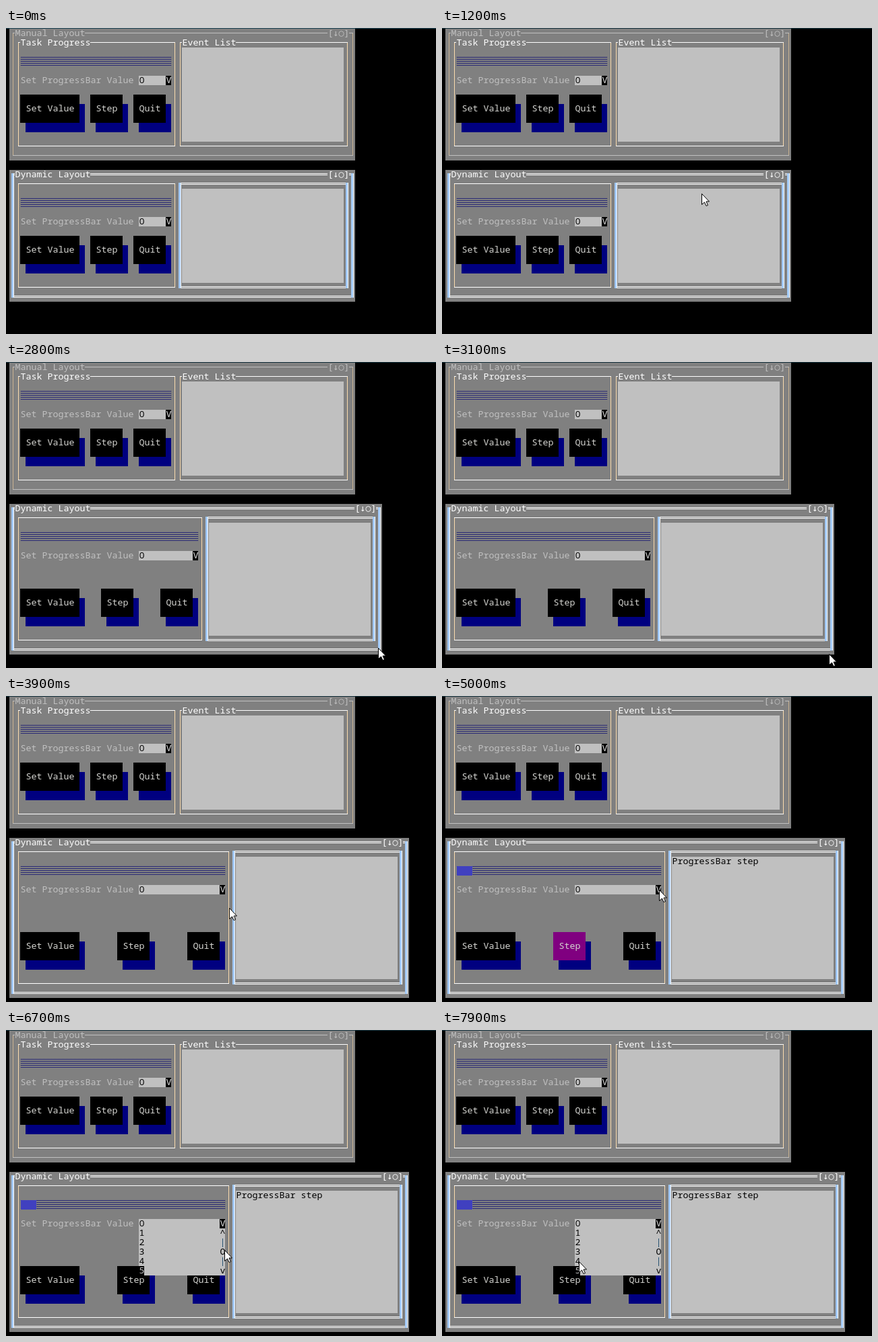
Recreate the animation shown at these times as an HTML page with a canvas. Size 638 by 455 pixels, loop 8000 ms.

```html
<!DOCTYPE html>
<html lang="en">
<head>
<meta charset="utf-8">
<title>Console layout</title>
<style>
html, body { margin: 0; width: 100%; height: 100%; overflow: hidden; background: #000; }
canvas { display: block; }
</style>
</head>
<body>
<canvas id="stage" width="638" height="455"></canvas>
<script>
const ctx = document.getElementById('stage').getContext('2d', { alpha: false });
const LOOP = 8000, STEP = 100;
const CW = 8, CH = 14;
const GRAY = '#808080', SILVER = '#c0c0c0', NAVY = '#000080', PURPLE = '#800080';
const FONT = '13.333px "Noto Sans Mono", "DejaVu Sans Mono", monospace';
const ZERO_FONT = '13.5px "Open Sans", sans-serif';
const SYMBOL_FONT = '13.3px "DejaVu Sans Mono", monospace';

// Pointer path: time, x, y
const PATH = [
  [100, 440, 2], [700, 362, 219], [1100, 362, 219], [1800, 524, 405],
  [2000, 512, 403], [2400, 512, 399], [2500, 512, 399], [2800, 552, 425],
  [3300, 589, 440], [3500, 589, 440], [3900, 331, 315], [4200, 204, 365],
  [4500, 204, 365], [5000, 322, 288], [5100, 322, 288], [5200, 321, 331],
  [5400, 321, 358], [5800, 321, 358], [6300, 324, 316], [6500, 324, 316],
  [6700, 324, 327], [6900, 324, 332], [7000, 324, 332], [7600, 216, 356],
  [7900, 203, 344]
];

const colX = c => 5 + c * CW;
const rowY = r => 1 + r * CH;

function rect(x, y, w, h, color) {
  ctx.fillStyle = color;
  ctx.fillRect(x, y, w, h);
}

function cells(c, r, w, h, color) {
  rect(colX(c), rowY(r), w * CW, h * CH, color);
}

function text(c, r, str, color, back) {
  if (back) cells(c, r, str.length, 1, back);
  ctx.fillStyle = color;
  [...str].forEach((ch, i) => {
    ctx.font = ch === '0' ? ZERO_FONT : '↓○'.includes(ch) ? SYMBOL_FONT : FONT;
    ctx.fillText(ch, colX(c + i) + 4.5, rowY(r) + 11);
  });
}

function singleFrame(c, r, w, h, color, side) {
  const x = colX(c) + 5, y = rowY(r) + 6;
  const wide = (w - 1) * CW, tall = (h - 1) * CH;
  for (const dx of [0, wide]) rect(x + dx, y, 1, tall + 1, side);
  for (const dy of [0, tall]) rect(x, y + dy, wide + 1, 1, color);
}

function doubleFrame(c, r, w, h) {
  const x = colX(c) + 3, y = rowY(r) + 5;
  const wide = (w - 1) * CW, tall = (h - 1) * CH;
  for (const dy of [0, 2, tall, tall + 2]) rect(x, y + dy, wide + 4, 1, '#fff');
  for (const dx of [0, wide]) {
    rect(x + dx, y, 3, tall + 3, '#a3caf8');
    rect(x + dx + 3, y, 1, tall + 3, '#fff');
  }
}

function paneFrame(c, r, w, h) {
  singleFrame(c, r, w, h, '#fff', '#fbdcae');
}

function hatch(color, gapX, gapY, shift) {
  const tile = document.createElement('canvas');
  tile.width = gapX;
  tile.height = gapY;
  const g = tile.getContext('2d');
  g.fillStyle = color;
  g.fillRect(0, 0, 1, 1);
  if (shift) g.fillRect(gapX / 2, gapY / 2, 1, 1);
  return ctx.createPattern(tile, 'repeat');
}

const EMPTY_BAR = hatch('#000060', 2, 3, false);
const FULL_BAR = hatch('#0000ff', 2, 2, true);

function progress(c, r, w, done) {
  const x = colX(c), y = rowY(r);
  ctx.save();
  ctx.translate(x + 1, y);
  for (let dy = 0; dy < CH; dy += 3) rect(0, dy, w * CW - 1, 1, '#55558c');
  rect(0, 0, w * CW - 1, CH, EMPTY_BAR);
  if (done) {
    rect(0, 0, done * CW - 1, CH, GRAY);
    rect(0, 0, done * CW - 1, CH, FULL_BAR);
  }
  ctx.restore();
}

function button(c, r, label, color = '#000', pressed = false) {
  const w = label.length + 2, d = pressed ? 1 : 0;
  if (!pressed) cells(c + 1, r + 1, w, 3, NAVY);
  cells(c + d, r + d, w, 3, color);
  text(c + 1 + d, r + 1 + d, label, '#d4d4d0');
}

function layoutWindow(top, w, h, title, active, state = {}) {
  const pane = w - 34;
  rect(colX(0), rowY(top), w * CW + 1, h * CH, GRAY);
  const ink = active ? '#fff' : SILVER;
  if (active) doubleFrame(0, top, w, h);
  else singleFrame(0, top, w, h, SILVER, '#c9b391');
  text(1, top, title, ink, GRAY);
  text(w - 5, top, '[↓○]', ink, GRAY);

  paneFrame(1, top + 1, pane, h - 2);
  if (active) doubleFrame(pane + 1, top + 1, 32, h - 2);
  else {
    paneFrame(pane + 1, top + 1, 32, h - 2);
    text(2, top + 1, 'Task Progress', '#fff', GRAY);
    text(pane + 2, top + 1, 'Event List', '#fff', GRAY);
  }
  cells(pane + 2, top + 2, 30, h - 4, SILVER);
  if (state.stepped) text(pane + 2, top + 2, 'ProgressBar step', '#000');

  progress(2, top + 3, pane - 2, state.stepped ? 3 : 0);
  text(2, top + 5, 'Set ProgressBar Value', SILVER);
  cells(24, top + 5, pane - 25, 1, SILVER);
  text(24, top + 5, '0', '#000');
  text(pane - 1, top + 5, 'V', '#e0e0e0', '#000');

  const row = top + h - 7;
  button(2, row, 'Set Value');
  button(15 + Math.floor((w - 64) / 2), row, 'Step', state.focused ? PURPLE : '#000', state.pressed);
  button(w - 41, row, 'Quit');
  if (state.open) dropdown(24, top + 6, pane - 24, state.choice);
}

function dropdown(c, r, w, choice) {
  cells(c, r, w, 5, SILVER);
  for (let i = 0; i < 5; i++) {
    const on = choice === i + 1, mark = '^|O|v'[i];
    text(c, r + i, String(i + 1), on ? SILVER : '#000', on ? '#000' : SILVER);
    text(c + w - 1, r + i, mark, mark === '|' ? '#245070' : '#000');
  }
}

function pointerAt(t) {
  const i = PATH.findIndex(p => p[0] >= t);
  if (i <= 0) return PATH[i < 0 ? PATH.length - 1 : 0].slice(1);
  const [t0, x0, y0] = PATH[i - 1], [t1, x1, y1] = PATH[i];
  const k = (t - t0) / (t1 - t0);
  return [Math.round(x0 + (x1 - x0) * k), Math.round(y0 + (y1 - y0) * k)];
}

function pointer([x, y]) {
  ctx.save();
  ctx.translate(x + 0.5, y + 0.5);
  ctx.beginPath();
  ctx.moveTo(0, 0);
  for (const [px, py] of [[0, 16], [4, 12.5], [6.5, 18], [9, 17], [6.5, 11.5], [11, 11.5]]) ctx.lineTo(px, py);
  ctx.closePath();
  ctx.fillStyle = '#fff';
  ctx.fill();
  ctx.strokeStyle = '#000';
  ctx.lineWidth = 1;
  ctx.stroke();
  ctx.restore();
}

// The dragged corner follows the pointer in whole cells.
function windowSize(t) {
  const [x, y] = pointerAt(Math.min(Math.max(t, 2500), 3300));
  return [Math.floor((x - 5) / CW) + 1, Math.floor((y - 1) / CH) - 14];
}

function choiceAt(t) {
  return t >= 6700 ? 5 : t >= 6500 ? 1 : t >= 5700 ? 2 : 1;
}

function draw(t) {
  rect(0, 0, 638, 455, '#000');
  rect(0, 0, 638, 1, t < 100 ? '#1f4656' : '#17343f');
  layoutWindow(0, 64, 14, 'Manual Layout', false);
  const [w, h] = windowSize(t);
  layoutWindow(15, w, h, 'Dynamic Layout', true, {
    stepped: t >= 4500,
    focused: t >= 4400 && t < 5100,
    pressed: t >= 4400 && t < 4500,
    open: t >= 5100,
    choice: choiceAt(t)
  });
  if (t >= 100) pointer(pointerAt(t));
}

ctx.textAlign = 'center';
const start = performance.now();
function tick() {
  const t = (performance.now() - start) % LOOP;
  draw(Math.floor(t / STEP) * STEP);
  requestAnimationFrame(tick);
}
tick();
</script>
</body>
</html>
```
